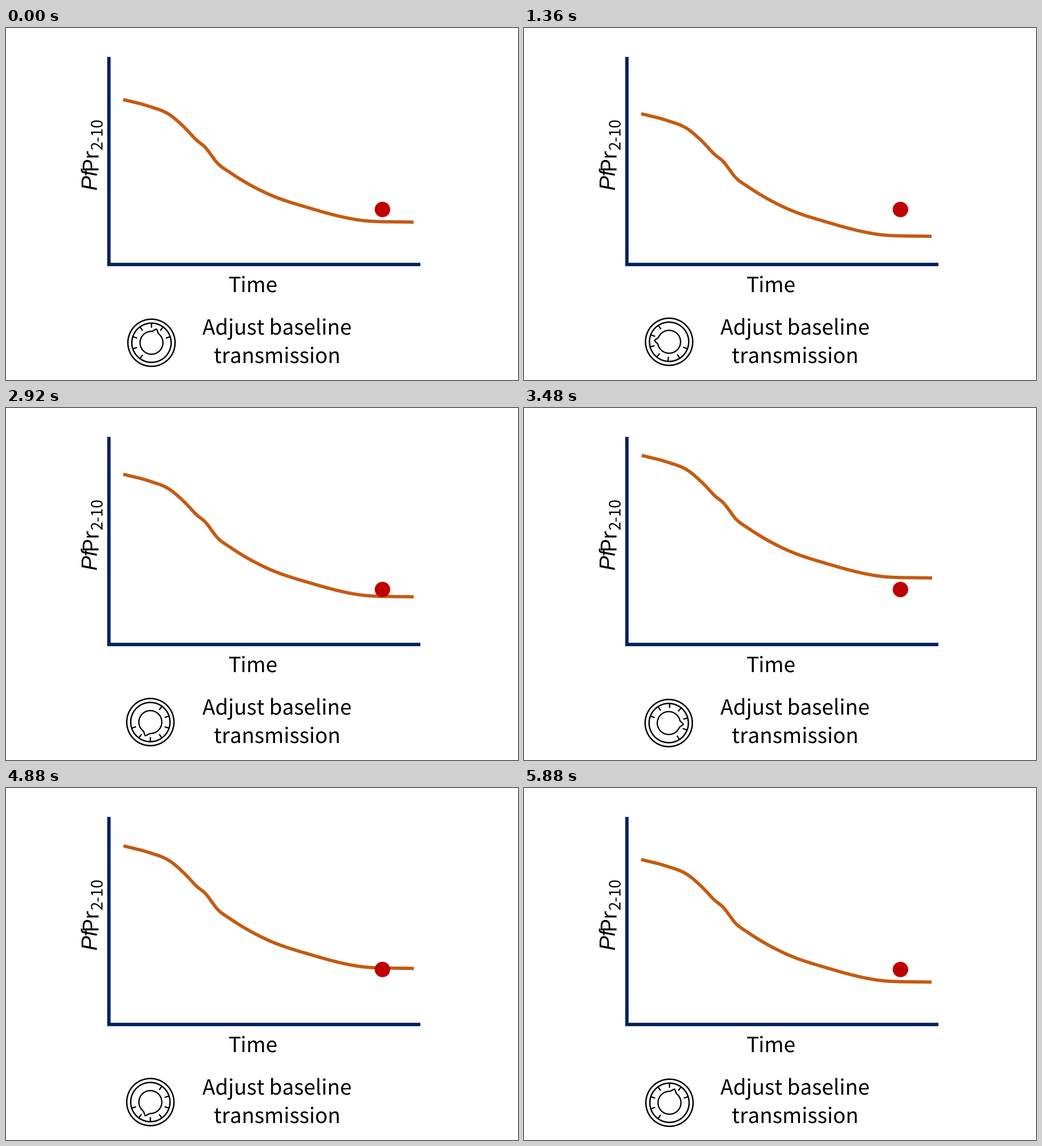
A matplotlib script for the animation above (5.92 s loop, 902x621 px).

```python
import matplotlib.pyplot as plt
import numpy as np
from matplotlib.animation import FuncAnimation
from matplotlib.patches import Circle
from matplotlib.transforms import Affine2D

W, H, DPI = 902, 621, 64
PT = 72 / DPI  # points per pixel
STEP_MS, FRAMES = 40, 148
PHASE = 49  # frames per stage; the last one rests
LEVELS = (0, 29.6, -48.2, 0)  # curve offset between stages

NAVY, ORANGE, RED = "#002060", "#C55A11", "#C00000"
SANS, SLANTED = "Noto Sans CJK JP", "Liberation Sans"

plt.rcParams["text.hinting"] = "none"
fig = plt.figure(figsize=(W / DPI, H / DPI), dpi=DPI, facecolor="white")
ax = fig.add_axes([0, 0, 1, 1])
ax.set_xlim(0, W)
ax.set_ylim(H, 0)
ax.set_autoscale_on(False)
ax.axis("off")

shift = Affine2D()
spin = Affine2D()


def label(x, y, text, size, font=SANS, **kw):
    ax.text(x, y, text, fontsize=size * PT, family=font, color="black",
            va="baseline", rotation_mode="anchor", **kw)


def stroke(x, y, width, color, move=None, **kw):
    base = ax.transData if move is None else move + ax.transData
    ax.plot(x, y, color=color, lw=width * PT, solid_capstyle="butt",
            solid_joinstyle="miter", snap=False, transform=base, **kw)


def polar(r, deg):
    """Points at radius r, angle clockwise from straight up."""
    a = np.radians(deg)
    return r * np.sin(a), -r * np.cos(a)


def smooth(x, y, per_span=16):
    """Cubic Hermite curve through the points, slopes from neighbours."""
    slope = np.gradient(y, x)
    i = np.repeat(np.arange(len(x) - 1), per_span)
    t = np.tile(np.linspace(0, 1, per_span), len(x) - 1)
    h = x[i + 1] - x[i]
    rise = t * t * (3 - 2 * t)
    bend = t * (1 - t) * ((1 - t) * slope[i] - t * slope[i + 1])
    return x[i] + h * t, y[i] + (y[i + 1] - y[i]) * rise + h * bend


def draw_chart():
    stroke([181.3, 181.3, 730], [51, 417.2, 417.2], 6, NAVY)
    knots = np.array([
        (206.5, 126.2), (250, 137.5), (289, 153.5), (313, 174),
        (337, 199), (349, 208.5), (374, 240), (394, 254.5),
        (460, 292), (534, 317.5), (620, 338.5), (718, 342.5),
    ])
    stroke(*smooth(*knots.T), 5.8, ORANGE, shift, zorder=3)
    ax.add_patch(Circle((663.2, 320.2), 13.6, color=RED, lw=0, zorder=4))


def draw_dial():
    body = Affine2D().translate(1, 0.6) + spin
    turn = np.arange(0, 361, 3)
    for radius in (34.6, 41.6):
        stroke(*polar(radius, turn), 2.5, "black", body)
    for deg in range(-144, 73, 36):
        stroke(*polar(np.array([26.5, 34]), deg), 2.3, "black", body)
    # knob with a pointed bump at 20 degrees
    off = np.abs((turn - 20 + 180) % 360 - 180)
    radius = 20.2 + 5.8 * np.clip(1 - off / 17, 0, 1) ** 1.3
    stroke(*polar(radius, turn), 2.3, "black", body)


def draw_labels():
    label(435, 467, "Time", 37, ha="center")
    label(477.5, 541, "Adjust baseline", 37, ha="center")
    label(477.5, 592, "transmission", 37, ha="center")
    up = dict(rotation=90, ha="left")
    label(160, 285, "Pf", 39, SLANTED, style="italic", **up)
    label(160, 251, "Pr", 38, **up)
    label(169.5, 214.5, "2-10", 27.5, **up)


def ease(p, power=2.2):
    if p < 0.5:
        return 0.5 * (2 * p) ** power
    return 1 - 0.5 * (2 - 2 * p) ** power


def update(frame):
    stage = min(frame // PHASE, len(LEVELS) - 2)
    p = min((frame - stage * PHASE) / (PHASE - 1), 1)
    start, end = LEVELS[stage:stage + 2]
    dy = start + (end - start) * ease(p)
    shift.clear().translate(max(0, -dy) / 48, dy)
    # full turns, alternating clockwise and back
    spin.clear().rotate_deg(360 * p * (-1) ** stage).translate(255.3, 554.7)
    return []


draw_chart()
draw_dial()
draw_labels()
update(0)

anim = FuncAnimation(fig, update, frames=FRAMES, interval=STEP_MS,
                     init_func=lambda: update(0), repeat=True,
                     repeat_delay=0, blit=False)
plt.show()
```
